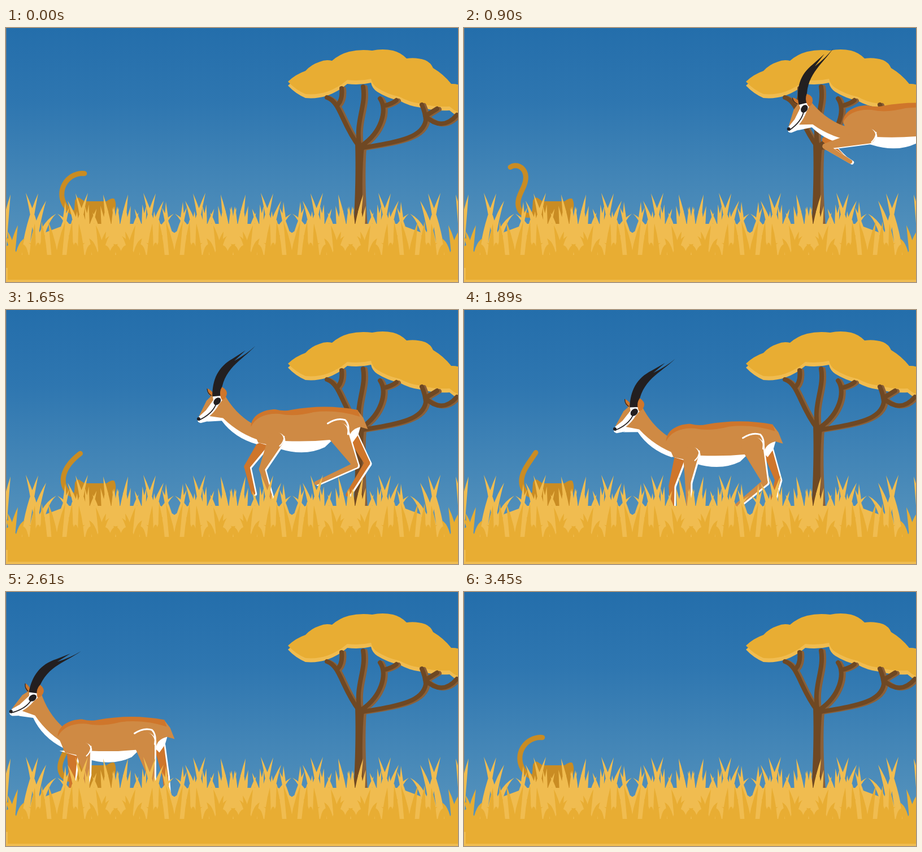
Write an HTML page with a canvas that moves like this. It is 800 px wide and 450 px high and loops after 3.48 s.

```html
<!DOCTYPE html>
<html lang="en">
<head>
<meta charset="utf-8">
<title>Savanna</title>
<style>
html, body { margin: 0; width: 100%; height: 100%; overflow: hidden; }
canvas { display: block; }
</style>
</head>
<body>
<canvas id="stage" width="800" height="450"></canvas>
<script>
const g = document.getElementById('stage').getContext('2d');
const LOOP = 3480;
const GOLD = '#e8ad33', STRAW = '#f0bc50', BARK = '#6f4823', BARK_LIT = '#8a6039';
const CAT = '#c98c23', COAT = '#cf8a44', COAT_DARK = '#cf762b', INK = '#231f20';

const shape = d => typeof d === 'string' ? new Path2D(d) : d;
const fill = (d, color) => { g.fillStyle = color; g.fill(shape(d)); };
const stroke = (d, color, width) => {
  g.strokeStyle = color;
  g.lineWidth = width;
  g.stroke(shape(d));
};
const mix = (a, b, u) => a + (b - a) * u;
const ease = u => (1 - Math.cos(Math.PI * u)) / 2;
const radians = degrees => degrees * Math.PI / 180;

let seed = 11;
const random = (low, high) => low + (high - low) * (seed = seed * 16807 % 2147483647) / 2147483647;

// ---- scenery
const sky = g.createLinearGradient(0, 0, 0, 400);
sky.addColorStop(0, '#246eab');
sky.addColorStop(.33, '#2e76b0');
sky.addColorStop(1, '#5794bd');

// Closed outline whose edges swell outwards like foliage.
function lumps(points, swell) {
  let d = `M${points[0]}`;
  points.forEach(([x, y], i) => {
    const [nx, ny] = points[(i + 1) % points.length];
    const k = swell / Math.hypot(nx - x, ny - y);
    d += `Q${(x + nx) / 2 + (ny - y) * k} ${(y + ny) / 2 - (nx - x) * k} ${nx} ${ny}`;
  });
  return new Path2D(d + 'Z');
}

const canopy = lumps([
  [499, 95], [530, 76], [555, 60], [577, 58], [607, 42], [648, 40], [685, 40], [709, 54],
  [742, 57], [756, 71], [788, 99], [810, 105], [810, 152], [785, 139], [734, 134],
  [697, 122], [657, 106], [646, 90], [604, 92], [568, 113], [530, 117]
], 4);
const branches = new Path2D('M568 123C592 131 594 170 625 210M594 107Q596 125 588 135M632 104C638 140 617 165 626 212M662 125C676 145 664 185 630 208M691 128Q684 134 669 138M632 212C690 202 738 196 743 163Q742 150 736 136M763 143L742 156Q772 184 798 154');

function tree() {
  g.save();
  g.translate(0, 7);
  fill(canopy, STRAW);
  g.restore();
  fill(canopy, GOLD);
  g.save();
  g.translate(4, 1);
  stroke(branches, BARK_LIT, 8);
  g.restore();
  fill('M622 205L638 212Q634 270 640 352H622Z', BARK_LIT);
  stroke(branches, BARK, 8);
  fill('M618 204L634 208Q628 270 633 352H615Q620 270 618 204Z', BARK);
}

// ---- grass, mirrored around evenly spaced dips
function blade(path, x, y, cx, cy, tx, ty, w) {
  path.moveTo(x - w / 2, y);
  path.quadraticCurveTo(cx - w / 2, cy, tx, ty);
  path.quadraticCurveTo(cx + w / 2, cy, x + w / 2, y);
}

// Each blade leans from its foot to its tip; distances run outwards from a dip.
const sprout = (tip, top, lean) => ({ foot: tip + lean, bend: tip + lean * .7, tip, top });
const tuft = (count, low, high) => Array.from({ length: count }, (_, i) =>
  sprout(15 + 90 * i / count, random(low, high), random(-22, 22)));
const tall = [
  sprout(1, 329, 36), sprout(19, 306, 26), sprout(33, 293, 24), sprout(55, 292, -26),
  sprout(82, 295, 15), sprout(101, 316, 0)
];
const short = tuft(13, 308, 340), front = tuft(15, 342, 385);
const backGrass = new Path2D(), frontGrass = new Path2D();

for (let dip = 90; dip < 800; dip += 208) {
  for (const side of [-1, 1]) {
    const plant = (path, blades, y, cy, w) => blades.forEach(b =>
      blade(path, dip + side * b.foot, y, dip + side * b.bend, cy, dip + side * b.tip, b.top, w));
    const inside = Math.abs(dip + side * 52 - 402) < 320;
    plant(backGrass, tall, 405, 345, 13);
    if (inside) plant(backGrass, short, 400, 355, 12);
    plant(frontGrass, front, 425, 380, 12);
  }
}

function grass() {
  fill(backGrass, STRAW);
  fill('M0 450V402L40 390 70 362 110 347H274L298 363 322 347H482L506 363 530 347H694L734 362 764 390 800 402V450Z', STRAW);
  fill(frontGrass, GOLD);
  fill('M3 446V402H800V446Z', GOLD);
  fill('M0 446H800V450H0Z', STRAW);
}

// ---- cat
// 1 is the tail curled right, -1 the tail waved left.
function tailSwing(t) {
  const turns = [[0, 1], [870, -1], [1680, .62], [2640, -1], [LOOP, 1]];
  const i = turns.findIndex(turn => turn[0] > t);
  const [[t0, a], [t1, b]] = [turns[i - 1], turns[i]];
  return mix(a, b, ease((t - t0) / (t1 - t0)));
}

function cat(t) {
  const s = tailSwing(t), steps = 30;
  const step = (95 - 12 * s + 23 * s * s) / steps;
  const tail = new Path2D();
  let x = 123, y = 329;
  tail.moveTo(x, y);
  for (let i = 0; i < steps; i++) {
    const f = (i + .5) / steps;
    const heading = radians(mix(150 * Math.sin(Math.PI * f) - 215, 165 * f - 160, (s + 1) / 2));
    tail.lineTo(x += step * Math.cos(heading), y += step * Math.sin(heading));
  }
  stroke(tail, CAT, 9);
  fill('M118 360L122 306Q126 297 133 303L139 307H178Q188 300 192 303 196 312 193 324L184 360Z', CAT);
}

// ---- gazelle
function taper(x1, y1, x2, y2, r1, r2) {
  const a = Math.atan2(y2 - y1, x2 - x1), q = Math.PI / 2;
  g.beginPath();
  g.arc(x1, y1, r1, a + q, a + 3 * q);
  g.arc(x2, y2, r2, a - q, a + q);
  g.fill();
}

// Two segments hanging from a joint of radius r, angles in degrees.
function leg(x, y, r, upper, upperAngle, lower, lowerAngle, color) {
  const a = radians(upperAngle), b = radians(lowerAngle);
  const kx = x + upper * Math.cos(a), ky = y + upper * Math.sin(a);
  const hx = kx + lower * Math.cos(b), hy = ky + lower * Math.sin(b);
  for (const [dx, dy, c] of [[3, 1.5, '#fff'], [0, 0, color]]) {
    g.fillStyle = c;
    taper(x + dx, y + dy, kx + dx, ky + dy, r, 5);
    taper(kx + dx, ky + dy, hx + dx, hy + dy, 5, 3.5);
  }
}

function head(angle) {
  g.save();
  g.translate(585, 200);
  g.rotate(angle);
  g.translate(-585, -200);
  fill('M440 180L466 177Q490 206 530 215L548 205 480 160Z', '#fff');
  fill('M449 137Q437 133 437 121 446 124 453 135Z', COAT_DARK);
  stroke('M448 135Q438 131 437 122', INK, 1.2);
  fill('M424 175L438 143 449 132 468 133 466 171Q446 178 429 183 421 182 424 175Z', '#fff');
  fill('M468 130Q488 162 520 179L556 192 540 209Q500 200 468 172L444 170Q454 160 459 149L465 140Z', COAT);
  fill('M447 132L437 143 425 172 437 160 449 141Z', COAT);
  fill('M447 135C445 105 454 82 479 66L501 50 482 70Q504 56 518 41C494 70 462 84 462 133Z', INK);
  fill('M462 136Q458 126 463 117 474 122 472 131 470 139 464 140Z', COAT_DARK);
  stroke('M454 149Q448 166 426 178', INK, 1.7);
  g.fillStyle = INK;
  g.beginPath();
  g.ellipse(456, 143, 5.5, 7.5, .7, 0, 7);
  g.fill();
  g.beginPath();
  g.arc(425, 176, 3, 0, 7);
  g.fill();
  g.restore();
}

function gazelle(t) {
  const x = .316 * (1380 - t) - .16 * Math.max(0, t - 2370);
  const drop = ease(Math.max(0, t - 1050) / 1350);
  const land = ease(Math.max(0, t - 750) / 1650); // 0 tucked in flight, 1 standing
  g.save();
  g.translate(x, 94 * drop - 13);
  leg(545, 204, 10, 58, 175 - 88 * land, 48, 42 + 60 * land, COAT_DARK);
  leg(698, 196, 9, 56, 36 + 44 * land, 66, 142 - 62 * land ** 2, COAT_DARK);
  head((t - 1380) * .000208);
  fill('M522 206L570 220Q615 234 650 217L670 198Z', '#fff');
  fill('M520 181C522 160 545 152 562 151Q585 156 605 150 660 142 708 152L718 165 726 185 712 181 690 203 660 204Q620 208 578 206L556 214 532 209Z', COAT);
  fill('M519 181C520 158 545 150 562 150Q578 154 590 151 650 140 708 151L712 163Q670 150 630 155 595 164 570 158 532 156 519 181Z', COAT_DARK);
  fill('M693 203Q693 186 713 181L709 195 699 209Z', '#fff');
  leg(563, 204, 14, 78 - 36 * land, 168 - 92 * land, 52, 30 + 75 * land, COAT);
  leg(672, 191, 19, 66, 36 + 44 * land, 76, 158 - 78 * land ** 6, COAT);
  stroke('M655 175Q672 164 686 169 694 177 691 194', '#fff', 3);
  stroke('M578 198Q578 208 570 215', '#fff', 2);
  g.restore();
}

function frame(now) {
  const t = now % LOOP;
  g.lineCap = g.lineJoin = 'round';
  g.fillStyle = sky;
  g.fillRect(0, 0, 800, 450);
  tree();
  cat(t);
  gazelle(t);
  g.fillStyle = 'rgba(120,125,130,.7)';
  g.fillRect(0, 0, 1, 400);
  grass();
  requestAnimationFrame(frame);
}
requestAnimationFrame(frame);
</script>
</body>
</html>
```
